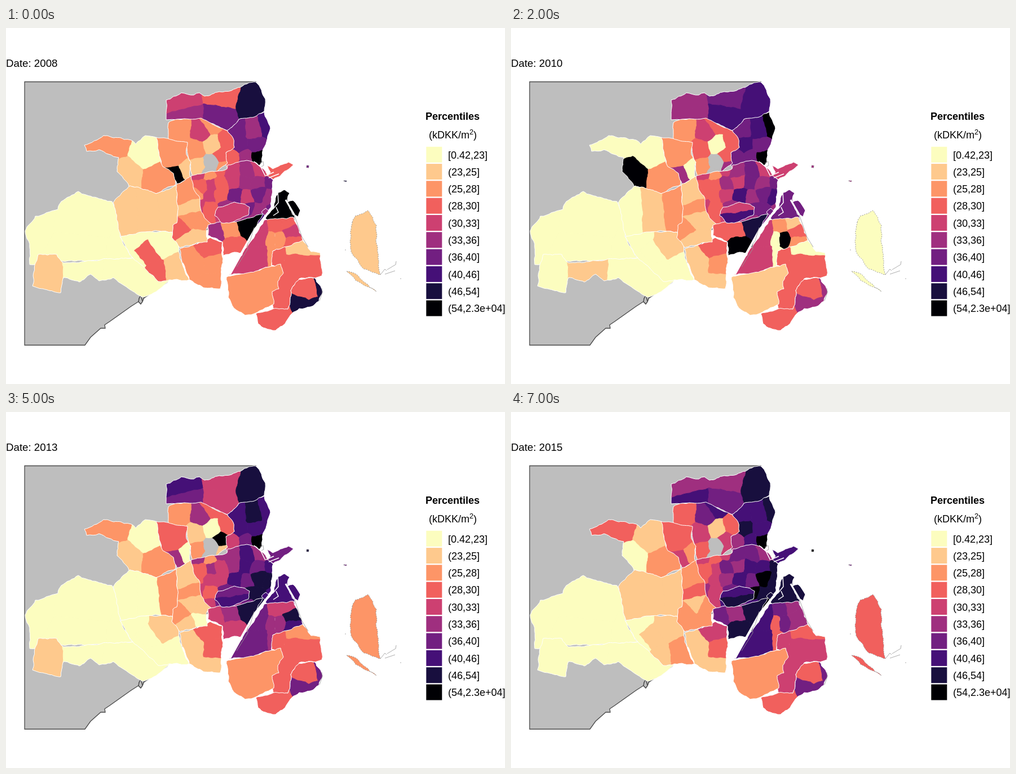
Recreate the animation shown at these times as an HTML page. Size 885 by 632 pixels, loop 8 s.

```html
<!DOCTYPE html>
<html lang="en">
<head>
<meta charset="utf-8">
<style>
  html, body { margin: 0; width: 100%; height: 100%; overflow: hidden; background: #fff; }
  svg { display: block; }
  text { font: 18px "Liberation Sans", Arial, sans-serif; }
</style>
</head>
<body>
<svg id="stage" width="885" height="632" viewBox="0 0 885 632">
  <text id="date" x="0" y="69" style="font-size:18.700px"></text>
  <path d="M33 95.500H443L400 300 285 452 244 480 222 494 184 521 175 527 176 533 168 533 150 549 140 563H33Z" fill="#bebebe" stroke="#4a4a4a" stroke-width="1.300"/>
  <path d="M236 480l3-5 6 3-3 8-3 4-4-4zM240 478l2 7" fill="#bebebe" stroke="#4a4a4a" stroke-width="1.500"/>
  <g id="map"></g>
  <g fill="none" stroke="#fff">
    <path d="M475 290L473 318 441 358 397 437" stroke-width="4"/>
    <path d="M461 262l14-6M466 266l18-7M440 237l12 10 8 16M482 290l1 20-10 12M479 318l4 9-9 6" stroke-width="1.500"/>
    <path d="M496 305l23 40" stroke-width="3"/>
  </g>
  <path d="M440 354l-7 24-5 6 1 8-20 32M450 240l6-3 1 7-4 2M511 331l14 40 11 18M560 462l1 8-5 14M664 438l8-10 3 3M676 429l15-9 1-6M672 437l18-6M699 445h2M601 394h2" fill="none" stroke="#999" stroke-width=".8"/>
  <g id="legend">
    <text x="744" y="163" style="font-weight:bold">Percentiles</text>
    <text x="750" y="196">(kDKK/m<tspan dy="-7" style="font-size:12.600px">2</tspan><tspan dy="7">)</tspan></text>
  </g>
</svg>
<script>
const YEARS = 8;
const palette = ["#fcfdbf", "#fec98d", "#fd9567", "#f1605d", "#cd4071",
                 "#9f2f7f", "#721f81", "#451077", "#180f3e", "#000004"];
const bounds = ["0.42", 23, 25, 28, 30, 33, 36, 40, 46, 54, "2.3e+04"];
const $ = id => document.getElementById(id);
const districts = [];
let towns = 0;

function add(parent, tag, attrs) {
  const el = document.createElementNS("http://www.w3.org/2000/svg", tag);
  for (const k in attrs) el.setAttribute(k, attrs[k]);
  return parent.appendChild(el);
}

const mix = (a, b, f) => a + (b - a) * f;
const clamp = (v, lo, hi) => Math.max(lo, Math.min(hi, v));
const parse = text => text.split(" ").map(p => p.split(",").map(Number));

// Repeatable noise in -1..1
function noise(x, y) {
  const n = Math.sin(x * 12.9898 + y * 78.233) * 43758.5453;
  return (n - Math.floor(n)) * 2 - 1;
}

// Surveyed-looking border: split edges and push midpoints sideways, alike from both sides
function raggedEdge(a, b) {
  const flip = a[0] < b[0] ? 1 : -1;
  const dx = b[0] - a[0], dy = b[1] - a[1], length = Math.hypot(dx, dy);
  if (length < 6) return [a];
  const x = (a[0] + b[0]) / 2, y = (a[1] + b[1]) / 2;
  const push = noise(Math.round(x), Math.round(y)) * Math.min(length * 0.1, 1.5) * flip / length;
  const middle = [x - dy * push, y + dx * push];
  return [...raggedEdge(a, middle), ...raggedEdge(middle, b)];
}
const ragged = poly => poly
  .flatMap((p, i) => raggedEdge(p, poly[(i + 1) % poly.length]))
  .map(p => p.map(v => v.toFixed(1))).join(" ");

// The part of the stage nearer to this seed than to any other
function cell(seed, seeds) {
  let poly = [[0, 0], [885, 0], [885, 632], [0, 632]];
  for (const other of seeds) {
    if (other === seed) continue;
    const side = p => Math.hypot(p[0] - seed[0], p[1] - seed[1]) ** 2
                    - Math.hypot(p[0] - other[0], p[1] - other[1]) ** 2;
    poly = poly.flatMap((p, i) => {
      const q = poly[(i + 1) % poly.length], a = side(p), b = side(q);
      const kept = a <= 0 ? [p] : [];
      if (a * b < 0) kept.push([0, 1].map(k => mix(p[k], q[k], a / (a - b))));
      return kept;
    });
  }
  return poly;
}

// Key levels are spread evenly over the years; "x" means no data
function levelAt(keys, year) {
  const at = year * (keys.length - 1) / (YEARS - 1), i = Math.floor(at);
  return Math.round(mix(+keys[i], +(keys[i + 1] ?? keys[i]), at - i));
}

// An outline divided among districts, each given as "key-levels seed seed ..."
function town(outline, ...parts) {
  const id = "town" + towns++, points = ragged(parse(outline));
  add(add($("map"), "clipPath", { id }), "polygon", { points });
  const group = add($("map"), "g", { "clip-path": `url(#${id})` });
  const seeds = parts.flatMap(part => {
    const [keys, ...rest] = part.split(" ");
    return parse(rest.join(" ") || "0,0").map(p => Object.assign(p, { keys }));
  });
  for (const seed of seeds)
    districts.push({ keys: seed.keys, el: add(group, "polygon", { points: ragged(cell(seed, seeds)) }) });
  return add($("map"), "polygon", { points, fill: "none", stroke: "#fff" });
}

// Small inner-city districts: dearer towards the harbour and over the years
function cityDistricts() {
  const list = [], step = 22;
  for (let y = 254; y < 350; y += step)
    for (let x = 340; x < 480; x += step) {
      const sx = x + 7 * noise(x, y), sy = y + 7 * noise(y, x);
      const near = clamp(1 - Math.hypot(sx - 452, sy - 315) / 110, 0, 1);
      let keys = "";
      for (let year = 0; year < YEARS; year++) {
        const growth = (year / (YEARS - 1)) * (0.8 + 1.7 * near);
        const wobble = noise(x, y + 1) + 0.7 * noise(x + year, y);
        keys += clamp(Math.round(2.9 + 3.4 * near + growth + wobble), 0, 9);
      }
      list.push(`${keys} ${sx},${sy}`);
    }
  return list;
}

// West
town("34,360 52,334 92,322 98,308 128,290 188,308 203,345 202,370 225,408 42,420 40,378",
  "00020000 135,345", "0 40,335 130,390 230,400");
town("47,458 57,402 90,402 102,417 228,407 245,425 290,448 262,470 243,478 203,453 190,443 165,449 150,437 130,451 102,443 97,470",
  "12000100 75,437", "00190000 130,430", "0 212,432");
town("139,208 173,191 222,199 230,206 247,191 268,195 275,240 297,248 301,278 266,294 218,281 197,255 200,230 165,216 143,219",
  "21023233 190,205", "00020001 250,222", "11910100 215,262", "2 268,268");
town("190,310 208,290 220,280 266,294 302,279 304,345 303,363 248,362 225,376 205,372 196,340",
  "10001011 212,325", "11110011 254,325", "11212221 290,322");
town("203,370 245,362 303,363 308,408 325,447 290,447 270,450 245,425 225,408",
  "0 228,372 228,418", "31021011 250,400 265,436", "01100111 276,382", "10042012 300,432");
town("308,392 340,383 362,372 384,380 385,410 380,463 350,461 325,447 312,415",
  "21190111 330,420 370,450", "33330334 364,388", "22211333 372,422");

// North
town("284,128 311,115 333,119 343,115 352,121 378,113 400,111 431,97 443,96 453,110 460,126 458,148 440,160 413,162 392,182 352,166 305,162 284,163",
  "45534765 312,132", "55556677 318,156", "35656445 386,122", "67744456 380,158", "87787888 438,135");
town("392,182 413,162 440,158 458,149 469,178 456,215 454,238 446,246 436,240 393,250 388,222 405,212 400,195",
  "67 410,182", "68 413,208", "56749887 441,182", "78978778 463,178", "67 445,208",
  "57 425,232", "9 449,230", "34632445 400,230");
town("288,168 305,162 346,160 392,182 403,196 405,212 390,221 393,240 375,254 360,264 330,264 326,236 317,203 288,202",
  "22211233 310,182", "446 346,184", "23339357 363,172", "3 392,202", "101 366,208", "23343144 336,216",
  "33355944 381,228", "25543144 385,246", "13 340,246", "x 366,240 358,260");
town("266,194 322,203 320,225 328,238 327,265 304,278 297,258 278,246",
  "22226333 295,222", "10011012 326,260", "95552544 302,270");
town("302,278 327,263 343,298 353,338 372,350 356,355 357,380 308,390 294,372 296,350 303,346",
  "212 317,296", "12200223 325,321", "21100111 329,338", "2112 348,347", "3222 308,360", "112 320,378", "1102 347,368");

// Centre
town("328,263 375,254 392,250 393,243 432,236 445,240 474,270 470,318 445,352 358,368 357,353 370,350 352,337 344,315 342,298 332,283",
  ...cityDistricts());
town("358,350 380,344 412,343 455,330 445,352 432,378 424,400 405,398 385,404 384,380 358,368",
  "23305555 395,358", "98866888 432,350", "33934448 400,388", "54334446 372,365");
town("370,333 376,318 405,309 424,313 432,318 430,332 400,345 382,346",
  "44455667 400,318", "46767778 402,338");
town("463,244 473,250 501,238 510,243 486,263 474,269 464,262 469,256", "33445667");

// Islands in the south-east
town("460,338 475,320 483,292 494,287 503,293 499,304 512,334 513,346 475,350", "98659788");
town("499,309 509,306 522,324 518,335 508,331", "98659788");
town("453,327 461,320 469,326 460,335", "58");
town("396,438 425,391 458,341 510,336 515,348 527,378 473,396 471,423 430,436",
  "44436667 456,400 456,372 452,350", "21026553 471,400 471,375", "22962556 483,375",
  "32293446 478,350", "31103455 498,345", "43324855 506,362", "33214775 508,382");
town("473,396 526,377 541,397 557,399 560,440 548,444 520,445 505,466 500,499 475,500 465,470 487,430 471,421",
  "33332344 520,418 470,398", "10021233 520,385");
town("391,442 445,431 487,419 492,435 482,450 484,463 472,468 475,490 435,509 424,510 404,497 394,478", "21111222");
town("443,507 475,498 500,499 505,466 520,446 548,444 562,468 555,485 540,495 520,498 507,507 490,529 478,537 460,533 447,525",
  "32323333 537,465 490,515", "87576676 565,460 549,497 525,497");

// Remote islands and specks, with a broken grey shoreline
for (const [outline, keys] of [
  ["614,345 619,334 642,324 657,350 656,376 664,438 635,428 612,397", "11021233"],
  ["604,432 617,435 657,468 620,448", "11021233"],
  ["533,244 537,244 537,248 533,248", "65577889"],
  ["599,271 604,271 604,273 599,272", "85548666"]
]) {
  const shore = town(outline, keys);
  shore.setAttribute("stroke", "#999");
  shore.setAttribute("stroke-dasharray", "2 2");
}

palette.forEach((fill, i) => {
  const y = 210.8 + i * 30.3;
  add($("legend"), "rect", { x: 745.3, y, width: 28, height: 28, fill });
  add($("legend"), "text", { x: 784, y: y + 20.7 })
    .textContent = `${i ? "(" : "["}${bounds[i]},${bounds[i + 1]}]`;
});

let shown = -1;
const start = performance.now();
function tick() {
  const year = Math.floor((performance.now() - start) / 1000) % YEARS;
  if (year !== shown) {
    shown = year;
    $("date").textContent = "Date: " + (2008 + year);
    for (const { el, keys } of districts) {
      const color = palette[levelAt(keys, year)] || "#bebebe";
      el.setAttribute("fill", color);
      el.setAttribute("stroke", color);
    }
  }
  requestAnimationFrame(tick);
}
tick();
</script>
</body>
</html>
```
